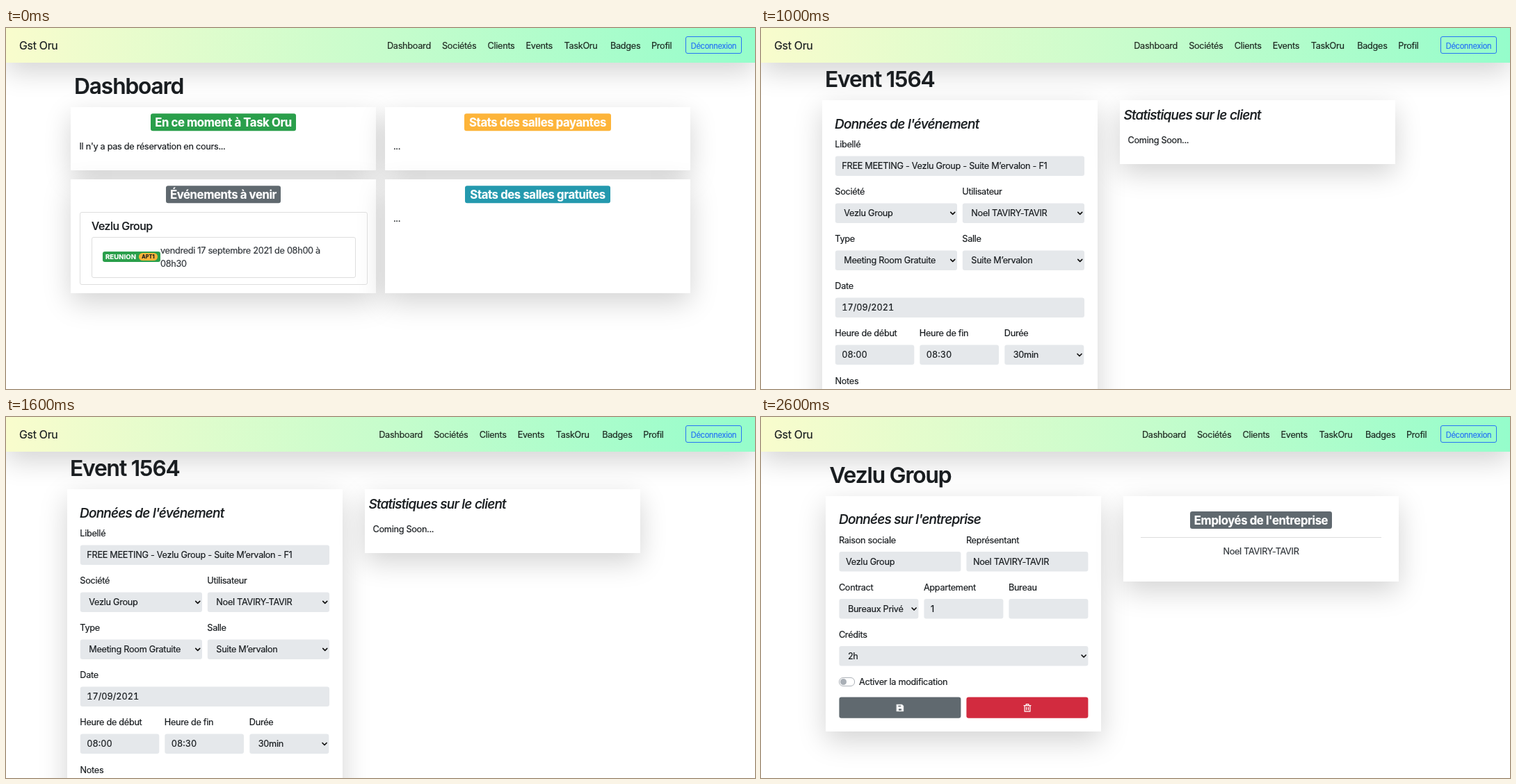
These frames come from a looping animation (1077 by 520 pixels, 3 s). An HTML page:

```html
<!DOCTYPE html>
<html lang="fr">
<head>
<meta charset="utf-8">
<title>Dashboard</title>
<style>
  html, body { margin: 0; width: 100%; height: 100%; overflow: hidden; background: #fff; }
  body {
    position: relative; color: #191d20;
    font: 12.7px Inter, "Open Sans", sans-serif;
    font-optical-sizing: none; letter-spacing: -.0225em;
    -webkit-text-stroke: .2px;
  }
  div, svg { position: absolute; box-sizing: border-box; }
  .scene { inset: 0; visibility: hidden; }
  .scene.on { visibility: visible; }
  .bar, .card { box-shadow: 0 12.7px 38px rgba(0, 0, 0, .175); }
  .bar {
    left: 0; top: 0; width: 100%; height: 50px;
    background: linear-gradient(90deg, #f9fccd, #95fdcb);
  }
  .card { background: #fff; }
  .text { line-height: 0; white-space: nowrap; }
  .mid { transform: translateX(-50%); }
  .brand { font-size: 15.9px; }
  .link { color: rgba(0, 0, 0, .82); }
  .h1 { font-size: 31.7px; font-weight: 600; letter-spacing: -.035em; }
  .h4 { font-size: 19px; font-style: italic; font-weight: 500; letter-spacing: -.04em; }
  .h5 { font-size: 15.9px; font-weight: 500; letter-spacing: -.03em; }
  .soft { color: #32373c; }
  .time { font-variant-numeric: tabular-nums; letter-spacing: 0; }
  .label { font-size: 16.67px; font-weight: 700; letter-spacing: -.022em; color: #fff; }
  .tag { font-size: 9.5px; font-weight: 700; letter-spacing: .01em; color: #fff; }
  .mini { font-size: 7.1px; font-weight: 700; letter-spacing: .03em; }
  .logout { font-size: 11.1px; color: #2674f5; }
  .outline { border: 1px solid #2674f5; border-radius: 3px; }
  .frame { border: 1px solid #dedede; border-radius: 3px; }
  .switch { border: 1px solid #adb2b8; border-radius: 6px; background: #fff; }
  .knob { border-radius: 50%; background: #a9afb6; }
  .rule { background: #dcdcdc; }
  svg { left: 0; top: 0; width: 100%; height: 100%; }
</style>
</head>
<body>
<script>
const GREEN = '#2a9f4b', AMBER = '#fdb439', GRAY = '#60696f', TEAL = '#2499ae', RED = '#d22b3f';
const COMPANY = 'Vezlu Group', PERSON = 'Noel TAVIRY-TAVIR', ROOM = 'Suite M’ervalon';
let scene;

function add(cls, x, y, css = {}) {
  const el = document.createElement('div');
  el.className = cls;
  Object.assign(el.style, { left: x + 'px', top: y + 'px' }, css);
  scene.append(el);
  return el;
}

// Boxes are given by their left, top, right and bottom edges.
const box = (cls, x0, y0, x1, y1) => add(cls, x0, y0, { width: x1 - x0 + 'px', height: y1 - y0 + 'px' });

const svg = markup => scene.insertAdjacentHTML('beforeend', `<svg>${markup}</svg>`);

// Rounded fill with smooth edges at fractional positions.
const fill = (x0, y0, x1, y1, color, r = 3.2) =>
  svg(`<rect x="${x0}" y="${y0}" width="${x1 - x0}" height="${y1 - y0}" rx="${r}" fill="${color}"/>`);

// The capitals are centred on y.
const text = (str, x, y, cls = '') => { add('text ' + cls, x, y).textContent = str; };

const icon = (x, y, d, color, width, inside = 'none') =>
  svg(`<path transform="translate(${x} ${y})" d="${d}" fill="${inside}" fill-rule="evenodd" stroke="${color}"
    stroke-width="${width}" stroke-linecap="round" stroke-linejoin="round"/>`);

function badge(str, x0, y0, x1, color) {
  fill(x0, y0, x1, y0 + 25, color);
  text(str, (x0 + x1) / 2, y0 + 12.5, 'label mid');
}

function input(name, x0, x1, y, value, cls) {
  text(name, x0 - .5, y - 16.5);
  fill(x0, y, x1, y + 28.5, '#e5e8eb');
  text(value, x0 + 9.5, y + 14.5, cls);
}

function select(name, x0, x1, y, value) {
  input(name, x0, x1, y, '');
  text(value, x0 + 12.5, y + 14.5);
  icon(x1 - 6.3, y + 14.5, 'M-3 -1.5L0 1.5L3 -1.5', '#111', 1.7);
}

function header(shift) {
  add('bar', 0, 0);
  text('Gst Oru', 19, 25.5, 'brand');
  const links = { Dashboard: 548, Sociétés: 627, Clients: 692.5, Events: 747.5, TaskOru: 802.5, Badges: 869, Profil: 928 };
  for (const [name, x] of Object.entries(links)) text(name, x - shift, 25.5, 'link');
  box('outline', 977, 12, 1058, 37);
  text('Déconnexion', 1017.5, 25.5, 'logout mid');
}

function dashboard() {
  text('Dashboard', 98, 83.5, 'h1');
  box('card', 93, 114, 532, 205);
  box('card', 545, 114, 984, 205);
  box('card', 93, 218, 532, 382);
  box('card', 545, 218, 984, 382);
  badge('En ce moment à Task Oru', 208, 123.3, 417, GREEN);
  badge('Stats des salles payantes', 659, 123.3, 870, AMBER);
  badge('Événements à venir', 230, 227.3, 395, GRAY);
  badge('Stats des salles gratuites', 660, 227.3, 869, TEAL);
  text("Il n'y a pas de réservation en cours...", 105.5, 170.5);
  text('...', 557, 170.5);
  text('...', 557, 274.5);
  box('frame', 106, 265, 520, 370);
  text(COMPANY, 123, 285.5, 'h5');
  box('frame', 123, 301, 503, 360);
  fill(139, 322, 222, 337, GREEN);
  text('REUNION', 143, 329.5, 'tag');
  fill(191, 324, 218, 335, AMBER, 5.5);
  text('APT1', 204.5, 330, 'mini mid');
  text('vendredi 17 septembre 2021 de 08h00 à', 222, 321, 'soft');
  text('08h30', 222, 340, 'soft');
}

function eventPage() {
  text('Event 1564', 92, 73.5, 'h1');
  box('card', 88, 104, 484, 640);
  box('card', 516, 104, 912, 196);
  text("Données de l'événement", 106, 138.5, 'h4');
  input('Libellé', 106.8, 465, 184.4, `FREE MEETING - ${COMPANY} - ${ROOM} - F1`);
  select('Société', 106.8, 282, 252.4, COMPANY);
  select('Utilisateur', 289.8, 465, 252.4, PERSON);
  select('Type', 106.8, 282, 320.4, 'Meeting Room Gratuite');
  select('Salle', 289.8, 465, 320.4, ROOM);
  input('Date', 106.8, 465, 388.5, '17/09/2021', 'time');
  input('Heure de début', 106.8, 220.3, 456.5, '08:00', 'time');
  input('Heure de fin', 228.3, 342, 456.5, '08:30', 'time');
  select('Durée', 350.3, 464.3, 456.5, '30min');
  text('Notes', 106.5, 508.5);
  text('Statistiques sur le client', 521.5, 126, 'h4');
  text('Coming Soon...', 527.5, 162);
}

function companyPage() {
  text(COMPANY, 98.5, 83.5, 'h1');
  box('card', 93, 114, 489, 453);
  box('card', 521, 114, 917, 237);
  text("Données sur l'entreprise", 112, 148, 'h4');
  input('Raison sociale', 112.4, 287.4, 194, COMPANY);
  input('Représentant', 295.4, 470.4, 194, PERSON);
  select('Contract', 112.4, 226.4, 262, 'Bureaux Privé');
  input('Appartement', 234.4, 348.4, 262, '1');
  input('Bureau', 356.4, 470.4, 262, '');
  select('Crédits', 112.4, 470.4, 330, '2h');
  box('switch', 112, 375, 135, 388);
  box('knob', 114, 377, 123, 386);
  text('Activer la modification', 141, 381.5);
  fill(112.4, 403.6, 287.4, 433.7, GRAY);
  fill(295.4, 403.6, 470.4, 433.7, RED);
  icon(200, 419, 'M-4.8 -4.8H2.8L4.8 -2.8V4.8H-4.8ZM-2.8 -3.6H1.4V-1.4H-2.8ZM-2.2 1H2.2V4H-2.2Z', '#fff', .6, '#fff');
  icon(383, 419, 'M-5 -3.4H5M-1.8 -3.6V-5.4H1.8V-3.6M-3.9 -3.2V5.2H3.9V-3.2M-1.4 -.8V2.8M1.4 -.8V2.8', '#fff', 1.2);
  badge("Employés de l'entreprise", 617, 136, 821, GRAY);
  box('rule', 546, 173, 892, 174);
  text(PERSON, 719, 193.5, 'soft mid');
}

const pages = [[dashboard, 0], [eventPage, 11.8], [companyPage, 0]];
const scenes = pages.map(([draw, shift]) => {
  scene = document.createElement('div');
  scene.className = 'scene';
  document.body.append(scene);
  header(shift);
  draw();
  return scene;
});

const start = performance.now();
function tick() {
  const now = Math.floor((performance.now() - start) / 1000) % scenes.length;
  scenes.forEach((el, i) => el.classList.toggle('on', i === now));
  requestAnimationFrame(tick);
}
tick();
</script>
</body>
</html>
```
